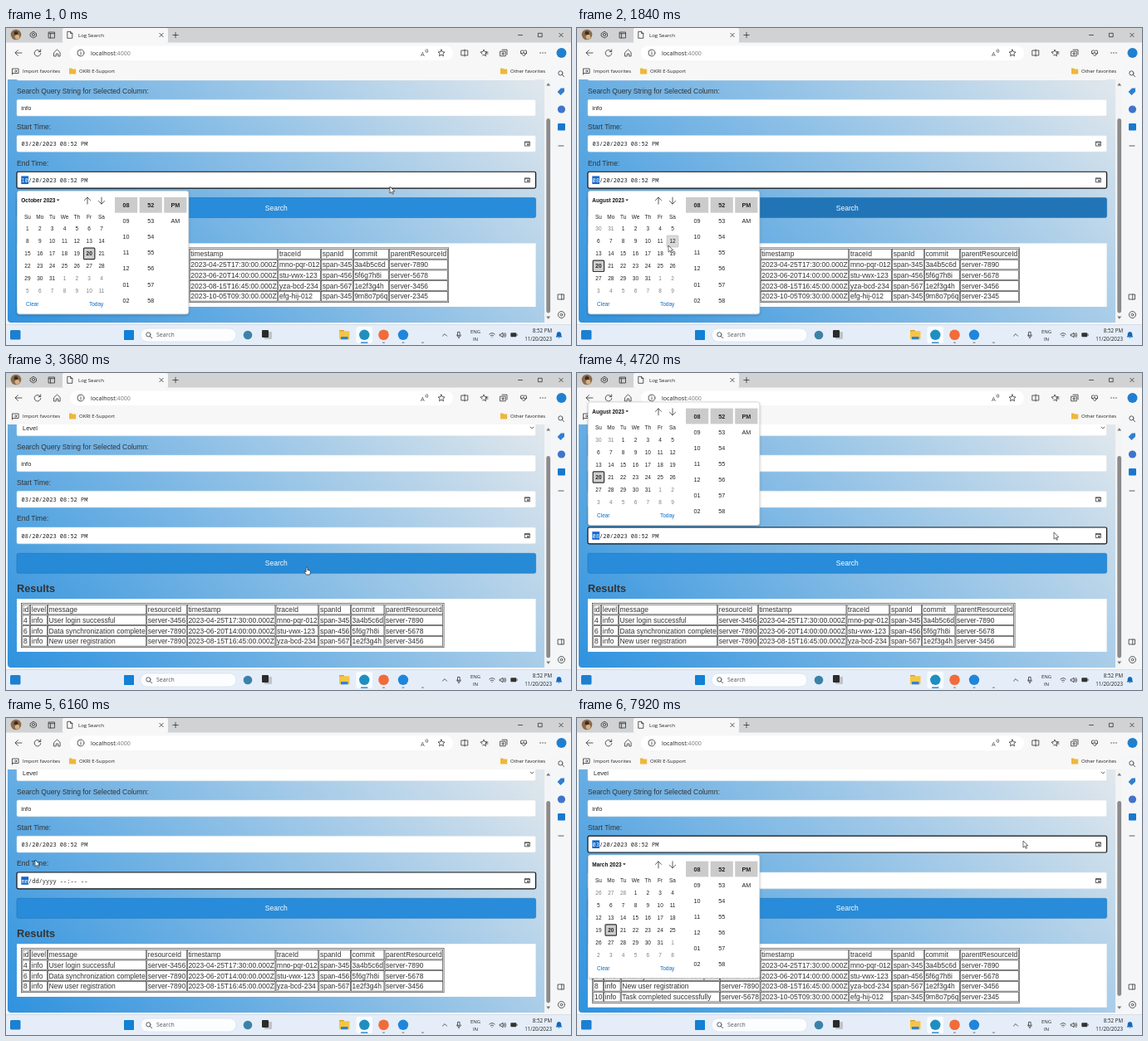
An HTML page that plays this animation: 680x382 px, repeating every 8000 ms.

```html
<!DOCTYPE html>
<html lang="en">
<head>
<meta charset="utf-8">
<title>Log Search</title>
<style>
  html, body { margin: 0; width: 100%; height: 100%; overflow: hidden; background: #f7f7f7; }
  svg { display: block; width: 680px; height: 382px; }
  text { white-space: pre; }
  .ui { font-family: "Open Sans", "Noto Sans", sans-serif; }
  .page { font-family: "Liberation Sans", Arial, sans-serif; }
  .mono { font-family: "Noto Sans Mono", "Liberation Mono", monospace; }
  .ico { fill: none; stroke: #333; stroke-width: .8; stroke-linecap: round; stroke-linejoin: round; }
</style>
</head>
<body>
<svg id="stage" viewBox="0 0 680 382" xmlns="http://www.w3.org/2000/svg">
  <defs>
    <linearGradient id="sky" gradientUnits="userSpaceOnUse" x1="78" y1="455" x2="572" y2="-38">
      <stop offset="0" stop-color="#2a90de"/><stop offset="1" stop-color="#e6eaed"/>
    </linearGradient>
    <clipPath id="view"><path d="M2 62H648V355H6Q2 355 2 351Z"/></clipPath>
    <filter id="shade" x="-10%" y="-10%" width="120%" height="125%">
      <feDropShadow dx="0" dy="1" stdDeviation="1.5" flood-opacity=".3"/>
    </filter>
  </defs>
  <g id="chrome"></g>
  <g clip-path="url(#view)">
    <rect x="2" y="62" width="646" height="293" fill="url(#sky)"/>
    <g id="page">
      <g id="form"></g>
      <rect id="button" x="13" y="217.3" width="624.6" height="24" rx="2" stroke="#1f74b8" stroke-width=".6"/>
      <g id="results"></g>
    </g>
  </g>
  <rect id="thumb" x="650.3" width="4.8" rx="2.4" fill="#8b8b8b"/>
  <g id="popup">
    <rect x="13.3" y="0" width="206.5" height="148.5" rx="3" fill="#fff" stroke="#c4c4c4" stroke-width=".6" filter="url(#shade)"/>
    <rect id="hover" width="14" height="14" rx="1" fill="#d9d9d9" stroke="#bbb" stroke-width=".6"/>
    <g id="calendar"></g>
  </g>
  <g id="cursor">
    <path id="arrow" d="M0 0V8.2L1.9 6.4L3.2 9.3L4.5 8.7L3.2 5.9H5.8Z" fill="#fff" stroke="#111" stroke-width=".6"/>
    <path id="hand" d="M-.9 .6Q0 -.6 .9 .6V3.4L3.9 4.2Q4.6 4.5 4.5 5.4L3.8 9H-.6L-3 5.6Q-2.4 4.5 -.9 5.8Z" fill="#fff" stroke="#111" stroke-width=".6"/>
  </g>
</svg>
<script>
const $ = id => document.getElementById(id);
const LOOP = 8000, CSS = 680 / 1280, SCROLL = -12.75;

// y is the vertical middle of the text
const text = (x, y, s, size, fill = '#222', more = '') =>
  `<text x="${x}" y="${y + size * .36}" font-size="${size}" fill="${fill}" ${more}>${s}</text>`;
const mid = 'text-anchor="middle"', bold = 'font-weight="700"';
const rect = (x, y, w, h, fill, r = 0, more = '') =>
  `<rect x="${x}" y="${y}" width="${w}" height="${h}" fill="${fill}" rx="${r}" ${more}/>`;
const dot = (x, y, r, fill) => `<circle cx="${x}" cy="${y}" r="${r}" fill="${fill}"/>`;
const icon = (x, y, d, more = '') => `<path class="ico" transform="translate(${x} ${y})" d="${d}" ${more}/>`;
const solid = fill => `style="fill:${fill};stroke:none"`;

const shapes = {
  cross: 'M-2.2-2.2L2.2 2.2M2.2-2.2L-2.2 2.2',
  plus: 'M-3.2 0H3.2M0-3.2V3.2',
  box: 'M-2.2-2.2H2.2V2.2H-2.2Z',
  lens: 'M2-.6A2.6 2.6 0 1 1-3.2-.6A2.6 2.6 0 1 1 2-.6M1.3 1.4L3.6 3.7',
  star: 'M0-4L1.2-1.3L4-1L1.9 .9L2.5 3.8L0 2.3L-2.5 3.8L-1.9 .9L-4-1L-1.2-1.3Z',
  panel: 'M-3.5-3H3.5V3H-3.5ZM.8-3V3',
  ring: 'M4 0A4 4 0 1 1-4 0A4 4 0 1 1 4 0',
  folder: 'M-4-3.6H-1L.2-2.4H4.2V3.6H-4Z'
};

function drawChrome() {
  const ui = [
    rect(0, 0, 680, 382, '#f7f7f7'),
    rect(0, 0, 680, 17.5, '#d0d2d4'),
    rect(68, 0, 127, 18, '#f7f7f7', 2),
    dot(12, 8, 6.3, '#8a6a4c'), dot(12, 6.2, 2.4, '#3c2c24'), dot(13.5, 10.8, 2.8, '#d9b184'),
    icon(33, 8, 'M-3.5-1.5L0-3.8L3.5-1.5V2L0 4L-3.5 2ZM1.6 0A1.6 1.6 0 1 1-1.6 0A1.6 1.6 0 1 1 1.6 0'),
    icon(55, 8.5, 'M-3.5-3.5H3.5V3.5H-3.5ZM-3.5-1.8H3.5M-1.5-1.8V3.5'),
    icon(77, 8.3, 'M-2.8-4H.6L2.8-1.8V4H-2.8ZM.6-4V-1.8H2.8'),
    text(87, 8.5, 'Log Search', 6.1),
    icon(187, 8.5, shapes.cross), icon(204, 8.5, shapes.plus),
    icon(619, 8.5, 'M-2.5 0H2.5'), icon(643, 8.5, shapes.box), icon(668, 8.5, shapes.cross),

    icon(15, 30, 'M4 0H-4L-.6-3.4M-4 0L-.6 3.4'),
    icon(38, 30, 'M3.4-1.5A3.8 3.8 0 1 0 3.8 .6M3.7-4V-1.4H1.1'),
    icon(61.5, 30, 'M-3.6-.6L0-4L3.6-.6V4H1.2V1H-1.2V4H-3.6Z'),
    rect(77, 21.5, 461, 17.5, '#fff', 8.7),
    icon(90, 30, shapes.ring + 'M0-.4V2M0-2V-1.9', 'stroke="#666"'),
    text(102, 30.2, 'localhost<tspan fill="#777">:4000</tspan>', 7.1),
    text(499, 31, 'A', 7.5, '#555'), icon(506, 27.5, 'M-1-1Q.6 0-1 1.4M.8-2Q3 0 .8 2.2'),
    icon(524, 30, shapes.star),
    icon(552, 30, 'M-3.8-3H3.8V3H-3.8ZM0-4V4'),
    icon(575, 30, shapes.star, 'stroke-dasharray="16 4"'), icon(577.5, 30, 'M0-1H2.5M0 1H2.5'),
    icon(599, 30, 'M-4-1.8H2.2V3.8H-4ZM-2-3.8H4V2M-.9-.5V2.5M-2.4 1H.6'),
    icon(623, 30, 'M0 3.6L-3.6 0Q-4.2-3.4-1.6-3.2L0-1.8L1.6-3.2Q4.2-3.4 3.6 0ZM-3.4 .4H-1L0-1L1 1.6L2 .4H3.4'),
    dot(643, 30, .7, '#333'), dot(646, 30, .7, '#333'), dot(649, 30, .7, '#333'),
    dot(668.5, 30, 6, '#1f80cf'),

    icon(11.5, 52, 'M-3.6-3H3.6V2.5H-3.6ZM-4 2.5V4M-1 0H1.5L.4-1.2M1.5 0L.4 1.2'),
    text(20, 52, 'Import favorites', 6),
    icon(80, 52, shapes.folder, solid('#eeb73c')), text(88, 52, 'OKRI E-Support', 6),
    icon(599, 52, shapes.folder, solid('#eeb73c')), text(607, 52, 'Other favorites', 6),

    rect(648, 62, 8, 293, '#f3f4f5'),
    icon(652.7, 68, 'M-2.4 1.4L0-1.8L2.4 1.4Z', solid('#777')),
    icon(652.7, 349, 'M-2.4-1.4L0 1.8L2.4-1.4Z', solid('#777')),
    rect(656.5, 45, 23.5, 312, '#f5f6f7'),
    icon(668, 55, shapes.lens),
    icon(668, 76.5, 'M-.2-4H4V.2L-.5 4.5L-4.4 .6Z', solid('#2f7fd0')),
    dot(668.5, 98, 4.6, '#3f74cc'), rect(664, 115, 9, 8.5, '#1878cf', 1),
    icon(668, 142, 'M-3 0H3', 'stroke="#999"'),
    icon(668, 324, shapes.panel),
    icon(668.5, 345.5, shapes.ring + 'M1.4 0A1.4 1.4 0 1 1-1.4 0A1.4 1.4 0 1 1 1.4 0', 'stroke-dasharray="2.4 .7"'),

    rect(0, 357.5, 680, 24.5, '#e5eef8'), rect(0, 357, 680, .7, '#cdd6df'),
    rect(5, 364, 12.5, 11.5, '#1c7fd0', 1.5),
    rect(142, 364, 12, 12, '#1180d6', .8),
    rect(162, 362, 115, 16, '#fbfdff', 8, 'stroke="#d3dbe4" stroke-width=".6"'),
    icon(172, 370, shapes.lens), text(181, 370, 'Search', 6.9, '#555'),
    dot(291, 370, 5.3, '#3c82a8'),
    rect(311, 366, 9, 9, '#bfc4ca', 1), rect(308, 364, 8, 9, '#2b2b2b', 1),
    rect(401, 364, 6, 5, '#d99a1c', 1), rect(401, 365.3, 12.5, 10, '#f6c544', 1), rect(403, 372, 8.5, 3.3, '#2d85cf', .6),
    rect(421.5, 360, 19.5, 20, '#f7fbff', 2), dot(431.3, 369.8, 6.2, '#1f8fc0'),
    rect(427, 378.5, 8.5, 1.3, '#0f6fc4', .6),
    dot(454.5, 369.8, 6.3, '#f26b3a'), dot(478, 369.8, 6.2, '#1f86dc'),
    ...[454.5, 478, 501.5].map(x => rect(x - 1.6, 378.5, 3.2, 1.2, '#888', .6)),
    icon(528, 370, 'M-2.6 1.2L0-1.4L2.6 1.2'),
    icon(545, 370, 'M-1.1-3.6H1.1V.6H-1.1ZM-2.4 0Q-2.2 2.4 0 2.4Q2.2 2.4 2.4 0M0 2.4V4'),
    text(565, 365.5, 'ENG', 6, '#222', mid), text(565, 375, 'IN', 6, '#222', mid),
    icon(585, 370, 'M-3.2-1Q0-4 3.2-1M-1.8 .7Q0-1 1.8 .7M0 2.4V2.5'),
    icon(598, 370, 'M-3.4-1H-2L0-3V3L-2 1H-3.4ZM1.4-1.4Q2.4 0 1.4 1.4M2.8-2.6Q4.6 0 2.8 2.6'),
    rect(607.3, 367.3, 7, 5, '#333', 1), rect(614.6, 368.8, .9, 2, '#333'),
    text(657, 365, '8:52 PM', 6.2, '#222', 'text-anchor="end"'),
    text(657, 374.3, '11/20/2023', 6.2, '#222', 'text-anchor="end"'),
    icon(665.5, 370, 'M-3.8 2.4L-2.8 .6V-1.4Q-2.4-4 0-4Q2.4-4 2.8-1.4V.6L3.8 2.4ZM-1 3.1H1Q0 4.6-1 3.1', solid('#1469b8'))
  ];
  $('chrome').setAttribute('class', 'ui');
  $('chrome').innerHTML = ui.join('');
}

function dateField(y, value, focus) {
  const edge = focus ? 'stroke="#111" stroke-width="1.2"' : 'stroke="#d5dde4" stroke-width=".5"';
  const head = focus ? rect(18.3, y + 5.2, 8.8, 9.6, '#1368ce') : '';
  return rect(13, y, 624.6, 19.8, '#fff', 1.8, edge) + head +
    text(18.6, y + 10, `<tspan fill="${focus ? '#fff' : '#222'}">${value.slice(0, 2)}</tspan>${value.slice(2)}`, 7, '#222', 'class="mono"') +
    icon(627.5, y + 10, 'M-2.8-2.4H2.8V2.6H-2.8ZM-2.8-1.5H2.8M.4 .4H1.6V1.4H.4Z', 'stroke="#222"');
}

function drawForm(s) {
  const plain = 'stroke="#d5dde4" stroke-width=".5"';
  $('form').innerHTML =
    rect(13, 56, 624.6, 19.8, '#fff', 1.8, plain) + text(20, 66, 'Level', 7.44) +
    icon(633, 66, 'M-1.8-.9L0 .9L1.8-.9') +
    text(13, 88.8, 'Search Query String for Selected Column:', 8.5, '#333') +
    rect(13, 99, 624.6, 19.8, '#fff', 1.8, plain) + text(18.3, 109, 'info', 7.44) +
    text(13, 131.5, 'Start Time:', 8.5, '#333') + dateField(142.2, '03/20/2023 08:52 PM', s.focus === 'start') +
    text(13, 175.2, 'End Time:', 8.5, '#333') + dateField(186, s.end, s.focus === 'end');
}

const head = ['id', 'level', 'message', 'resourceId', 'timestamp', 'traceId', 'spanId', 'commit', 'parentResourceId'];
const log = (id, msg, res, time, trace, span, commit, parent) =>
  [id, 'info', msg, 'server-' + res, `2023-${time}:00.000Z`, trace, 'span-' + span, commit, 'server-' + parent];
const logs = [
  log('4', 'User login successful', 3456, '04-25T17:30', 'mno-pqr-012', 345, '3a4b5c6d', 7890),
  log('6', 'Data synchronization complete', 7890, '06-20T14:00', 'stu-vwx-123', 456, '5f6g7h8i', 5678),
  log('8', 'New user registration', 7890, '08-15T16:45', 'yza-bcd-234', 567, '1e2f3g4h', 3456),
  log('10', 'Task completed successfully', 5678, '10-05T09:30', 'efg-hij-012', 345, '9m8o7p6q', 2345)
];
const pen = document.createElement('canvas').getContext('2d');
pen.font = '16px "Liberation Sans", Arial, sans-serif';

// columns fit their widest cell, as in an HTML table
function drawResults(count) {
  const rows = [head, ...logs.slice(0, count)], rowH = 24 * CSS, top = 277.6;
  const line = 'stroke="#2a2a2a" stroke-width=".6"';
  let x = 18.3 + 3 * CSS, cells = '';
  head.forEach((_, c) => {
    const w = Math.max(...rows.map(r => pen.measureText(r[c]).width)) * CSS + 4 * CSS;
    rows.forEach((r, i) => {
      const y = top + 3 * CSS + i * rowH;
      cells += rect(x, y, w, 22 * CSS, 'none', 0, line) + text(x + 2 * CSS, y + 11 * CSS, r[c], 8.5, '#333');
    });
    x += w + 2 * CSS;
  });
  const h = rows.length * rowH + 4 * CSS;
  $('results').innerHTML =
    text(325.3, 229.3, 'Search', 8.5, '#fff', mid) +
    text(13, 259, 'Results', 12.75, '#333', bold) +
    rect(13, 272.2, 624.6, h + 20 * CSS, '#fff') +
    rect(18.6, top, x - 18.3, h, 'none', 0, line) + cells;
}

const DAY_W = 14.85, DAY_H = 14.9, DAY_X = 25.9, DAY_Y = 45.8;
const pad = n => String(n).padStart(2, '0');

function drawCalendar(month) {
  const first = new Date(2023, month - 1, 1);
  const name = ['January', 'February', 'March', 'April', 'May', 'June', 'July', 'August', 'September', 'October'][month - 1];
  const title = name + ' 2023';
  pen.save();
  pen.font = 'bold 6.5px "Liberation Sans", Arial, sans-serif';
  const end = 18 + pen.measureText(title).width;
  pen.restore();
  let out = text(18.3, 11.2, title, 6.5, '#111', bold) +
    icon(end + 3.5, 11.2, 'M-1.8-.9H1.8L0 1.1Z', solid('#222')) +
    icon(98, 11.8, 'M0 4V-4L-3.6-.4M0-4L3.6-.4') + icon(115, 11.8, 'M0-4V4L-3.6 .4M0 4L3.6 .4');
  ['Su', 'Mo', 'Tu', 'We', 'Th', 'Fr', 'Sa'].forEach((d, i) =>
    out += text(DAY_X + i * DAY_W, 31, d, 6.5, '#222', mid));
  for (let i = 0; i < 42; i++) {
    const date = new Date(2023, month - 1, 1 - first.getDay() + i);
    const x = DAY_X + i % 7 * DAY_W, y = DAY_Y + Math.floor(i / 7) * DAY_H;
    const inside = date.getMonth() === month - 1, chosen = inside && date.getDate() === 20;
    if (chosen) out += rect(x - 6.7, y - 6.7, 13.4, 13.4, '#cecece', 1, 'stroke="#333" stroke-width="1.2"');
    out += text(x, y, date.getDate(), 6.5, inside ? '#222' : '#808080', mid + (chosen ? ' ' + bold : ''));
  }
  out += text(24, 136.8, 'Clear', 6.5, '#0a6cc8') + text(100, 136.8, 'Today', 6.5, '#0a6cc8');
  const columns = [[0, 1, 2, 3, 4, 5, 6].map(i => pad((7 + i) % 12 + 1)), [0, 1, 2, 3, 4, 5, 6].map(i => 52 + i), ['PM', 'AM']];
  columns.forEach((list, c) => {
    const x = 144.6 + c * 29.6;
    out += rect(x - 13.6, 7.6, 27.2, 18.8, '#cbcbcb');
    list.forEach((v, i) => out += text(x, 17 + i * 19.15, v, 7.2, '#222', mid + (i ? '' : ' ' + bold)));
  });
  $('calendar').innerHTML = out;
}

const mouse = [
  [0, 462, 191], [150, 462, 191], [700, 115, 207], [1330, 115, 207], [1840, 110, 262],
  [2150, 232, 228], [2400, 268, 214], [2600, 268, 214], [3100, 330, 300], [3300, 335, 298],
  [3680, 362, 234], [3850, 385, 230], [4200, 627, 196], [4440, 627, 196], [4720, 574, 192],
  [5450, 33, 171], [5750, 33, 171], [6160, 35, 171], [6600, 290, 226], [6850, 295, 228],
  [7250, 627, 152], [7540, 627, 152], [7920, 537, 148], [8000, 520, 150]
];
const hoverKeys = [
  [0, 0], [1690, 0], [1990, 1], [2600, 1], [2900, 0], [3640, 0], [3940, 1],
  [4000, 1], [4300, 0], [6580, 0], [6880, 1], [6980, 1], [7280, 0], [8000, 0]
];
const ease = k => k * k * (3 - 2 * k);
function track(keys, t) {
  const i = Math.max(1, keys.findIndex(k => k[0] >= t));
  const a = keys[i - 1], b = keys[i], k = ease((t - a[0]) / (b[0] - a[0]));
  return a.slice(1).map((v, n) => v + (b[n + 1] - v) * k);
}
const mix = (a, b, k) => `rgb(${a.map((v, i) => Math.round(v + (b[i] - v) * k))})`;

function stateAt(t) {
  const month = t < 860 ? 10 : t < 1250 ? 9 : t < 7480 ? 8 : 3;
  const popup = t < 2080 ? 196.3 : t >= 4360 && t < 5700 ? 35 : t >= 7480 ? 165 : null;
  return {
    month, popup,
    end: t < 5700 ? pad(month) + '/20/2023 08:52 PM' : 'mm/dd/yyyy --:-- --',
    focus: t < 2080 || t >= 4360 && t < 6800 ? 'end' : t >= 7480 ? 'start' : '',
    scroll: t < 2400 ? SCROLL : 0,
    rows: t < 2400 || t >= 6800 ? 4 : 3
  };
}

// redraw a part only when what it shows has changed
const shown = {};
function refresh(part, key, draw) {
  if (shown[part] !== key) { shown[part] = key; draw(); }
}

function render(t) {
  const s = stateAt(t), [x, y] = track(mouse, t), [dark] = track(hoverKeys, t);
  refresh('form', s.end + s.focus, () => drawForm(s));
  refresh('results', s.rows, () => drawResults(s.rows));
  refresh('calendar', s.month, () => drawCalendar(s.month));
  $('page').setAttribute('transform', `translate(0 ${s.scroll})`);
  $('button').setAttribute('fill', mix([40, 140, 218], [27, 95, 149], dark));

  const top = s.scroll ? 109 : 100, bottom = !s.scroll && s.rows === 4 ? 335 : 343.5;
  $('thumb').setAttribute('y', top);
  $('thumb').setAttribute('height', bottom - top);

  const open = s.popup !== null;
  $('popup').style.display = open ? '' : 'none';
  if (open) {
    $('popup').setAttribute('transform', `translate(0 ${s.popup})`);
    const col = Math.floor((x - DAY_X) / DAY_W + .5), row = Math.floor((y - s.popup - DAY_Y) / DAY_H + .5);
    const over = col >= 0 && col < 7 && row >= 0 && row < 6;
    $('hover').style.display = over ? '' : 'none';
    $('hover').setAttribute('x', DAY_X + col * DAY_W - 7);
    $('hover').setAttribute('y', DAY_Y + row * DAY_H - 7);
  }

  const by = y - s.scroll, onButton = !open && by > 217 && by < 241.5;
  $('hand').style.display = onButton ? '' : 'none';
  $('arrow').style.display = onButton ? 'none' : '';
  $('cursor').setAttribute('transform', `translate(${x} ${y})`);
}

for (const id of ['form', 'results', 'calendar']) $(id).setAttribute('class', 'page');
drawChrome();
const start = performance.now();
function tick() {
  render((performance.now() - start) % LOOP);
  requestAnimationFrame(tick);
}
tick();
</script>
</body>
</html>
```
